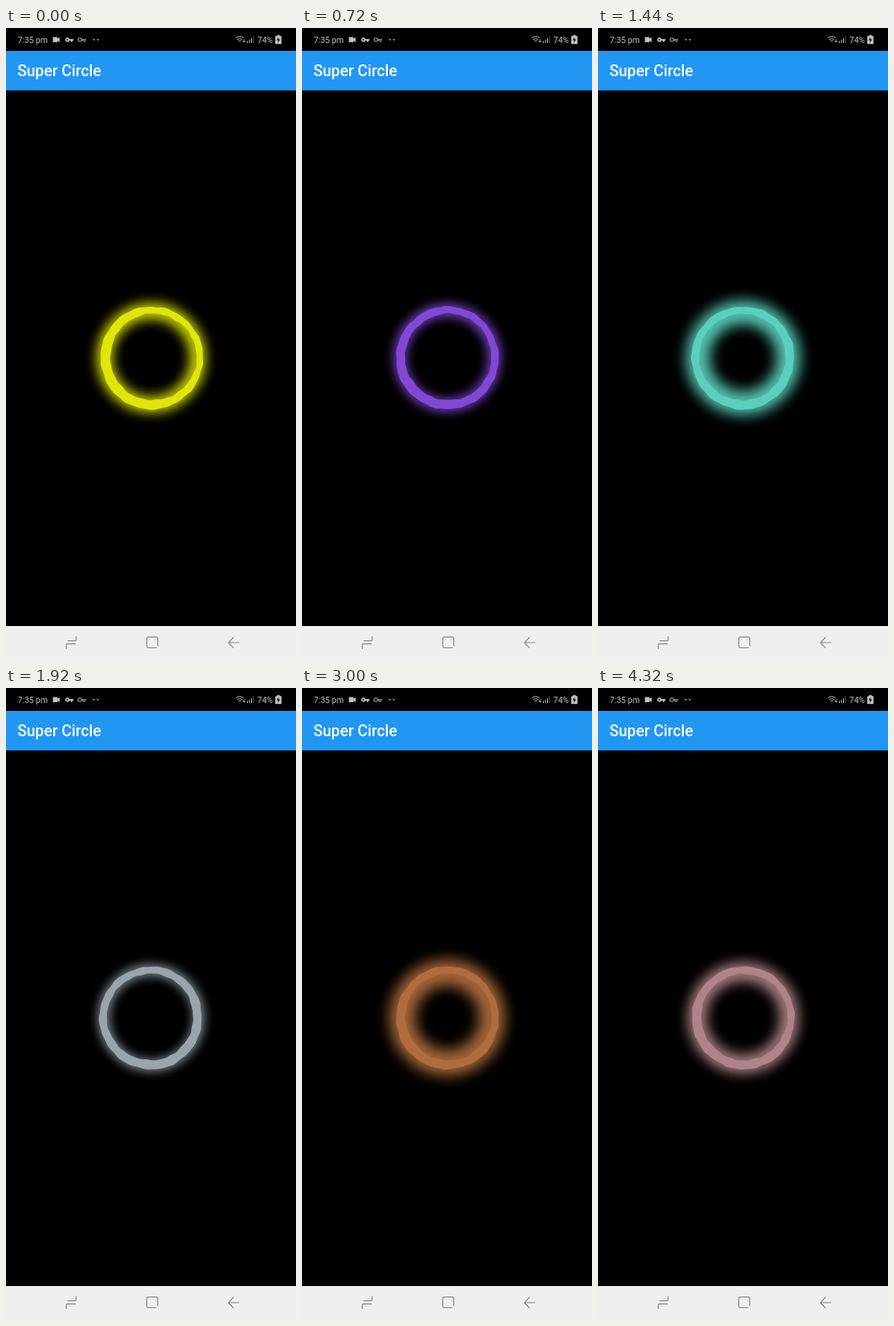
These frames come from a looping animation (368 by 800 pixels, 4440 ms). An HTML page:

```html
<!DOCTYPE html>
<html lang="en">
<head>
<meta charset="utf-8">
<title>Super Circle</title>
<style>
  html, body { margin: 0; width: 100%; height: 100%; overflow: hidden; background: #000; }
  svg { display: block; width: 100%; height: 100%; }
  text { font-family: Roboto, sans-serif; }
  .status { fill: #c4c4c4; font-size: 10.5px; }
  .icon { fill: #c4c4c4; }
  .line { fill: none; stroke: #c4c4c4; }
  .nav { fill: none; stroke: #858585; stroke-width: 1.2; }
</style>
</head>
<body>
<svg viewBox="0 0 368 800">
  <defs>
    <filter id="soft" filterUnits="userSpaceOnUse" x="64" y="298" width="240" height="240" color-interpolation-filters="sRGB">
      <feGaussianBlur id="blur"/>
    </filter>
  </defs>
  <rect width="368" height="800"/>

  <circle id="glow" cx="184.3" cy="417.5" fill="none" opacity=".95" filter="url(#soft)"/>
  <path id="ring" fill-rule="evenodd"/>

  <text class="status" x="15" y="19">7:35 pm</text>
  <path class="icon" d="M59.5 11.5h5.8v2.2l2.7-2v6.2l-2.7-2v2.1h-5.8z"/>
  <path class="icon" fill-rule="evenodd" d="M77.8 12a2.8 2.8 0 0 1 2.7 1.9h5v2h-1.2v1.9h-2v-1.9h-1.8a2.8 2.8 0 1 1-2.7-3.9zm0 1.8a1 1 0 1 0 .01 0z"/>
  <g class="line">
    <circle cx="93.7" cy="14.8" r="2.3"/>
    <path d="M96 14.3h5v1.3h-1v1.6h-1.8v-1.6h-2.2" stroke-width=".8"/>
  </g>
  <circle class="icon" cx="111.5" cy="14.8" r="1"/>
  <circle class="icon" cx="116.5" cy="14.8" r="1"/>

  <g class="line">
    <path d="M291.5 12.7q5-4 10 0M293.2 14.7q3.3-2.6 6.6 0M295 16.6q1.6-1.2 3.2 0"/>
    <path d="M302 14v4M300.4 16.2l1.6 1.9 1.6-1.9" stroke-width=".8"/>
    <path d="M306.5 19v-2.5M309 19v-4.3M311.5 19v-6.4"/>
    <path d="M314 19v-8.7" opacity=".55"/>
  </g>
  <text class="status" x="319" y="19">74%</text>
  <path class="icon" d="M344 9h3.400v1.200h2.200v10h-8v-10h2.400z"/>
  <path d="M346.300 11.600l-3 4h2l-.6 3.200 3.200-4.200h-2z"/>

  <rect y="29" width="368" height="50" fill="#2196f3"/>
  <text x="14.400" y="61" fill="#fff" font-size="19.600" font-weight="500">Super Circle</text>

  <rect y="757" width="368" height="43" fill="#efefef"/>
  <g class="nav">
    <path d="M78 775.6h10q1 0 1-1v-4.6M88.5 779.6h-11q-1 0-1 1v5.4"/>
    <path d="M189 784.5h-8.5q-1.8 0-1.8-1.8v-10q0-1.8 1.8-1.8h10.3q1.8 0 1.8 1.8v9.5M189 784.5h2"/>
    <path d="M296 778h-13.5M288.8 771.2l-6.5 6.8 6.5 6.8"/>
  </g>
</svg>
<script>
const LOOP = 4440, STEP = 120, PULSE = 1680, PEAK = 1270, SWAY = 3600;
const TAU = 2 * Math.PI;
const $ = id => document.getElementById(id);
const glow = $('glow'), ring = $('ring'), blur = $('blur');

const palette = [
  [0, '#dfe60a'], [720, '#8148d6'], [1440, '#5ad0bc'], [2400, '#dc7898'],
  [3000, '#b06c3c'], [3600, '#dab255'], [4320, '#b0838a']
];

const lerp = (a, b, f) => a + (b - a) * f;
const channels = hex => [1, 3, 5].map(i => parseInt(hex.slice(i, i + 2), 16));

function colorAt(t) {
  const i = palette.findIndex(([time]) => time > t);
  if (i < 0) return palette[palette.length - 1][1];
  const [[t0, c0], [t1, c1]] = palette.slice(i - 1, i + 1);
  const to = channels(c1);
  const mix = channels(c0).map((v, n) => Math.round(lerp(v, to[n], (t - t0) / (t1 - t0))));
  return `rgb(${mix})`;
}

function seeded(seed) {
  return () => {
    const x = Math.sin(++seed * 12.9898) * 43758.5453;
    return x - Math.floor(x);
  };
}

// Closed outline of a circle with a slightly ragged edge
function rough(cx, cy, r, rand) {
  const waves = [3, 7, 13, 22].map(n => [n, rand() * TAU]);
  let d = '';
  for (let i = 0; i < 144; i++) {
    const a = i / 144 * TAU;
    const q = waves.reduce((sum, [n, p]) => sum + .3 * Math.sin(n * a + p), r);
    d += (i ? 'L' : 'M') + (cx + q * Math.cos(a)).toFixed(2) + ' ' + (cy + q * Math.sin(a)).toFixed(2);
  }
  return d + 'Z';
}

function draw(t) {
  const color = colorAt(t);
  const wave = .5 + .5 * Math.cos(TAU * (t - PEAK) / PULSE);
  const spread = Math.pow(wave, 1.5);
  const sway = Math.cos(TAU * t / SWAY);
  const x = 184.3 + .6 * sway, y = 417.6;
  const rand = seeded(t / STEP * 20 + 7);

  glow.setAttribute('stroke', color);
  glow.setAttribute('r', lerp(60.5, 57, spread));
  glow.setAttribute('stroke-width', lerp(12, 32, spread));
  blur.setAttribute('stdDeviation', lerp(6.5, 9, spread));
  ring.setAttribute('fill', color);
  ring.setAttribute('d', rough(x, y, 65, rand) + rough(x + .7 + 1.4 * sway, y - 1.2, 54.8, rand));
}

let last = -1;
const start = performance.now();
function tick(now) {
  const t = Math.floor((Math.max(0, now - start) % LOOP) / STEP) * STEP;
  if (t !== last) draw(last = t);
  requestAnimationFrame(tick);
}
draw(0);
requestAnimationFrame(tick);
</script>
</body>
</html>
```
